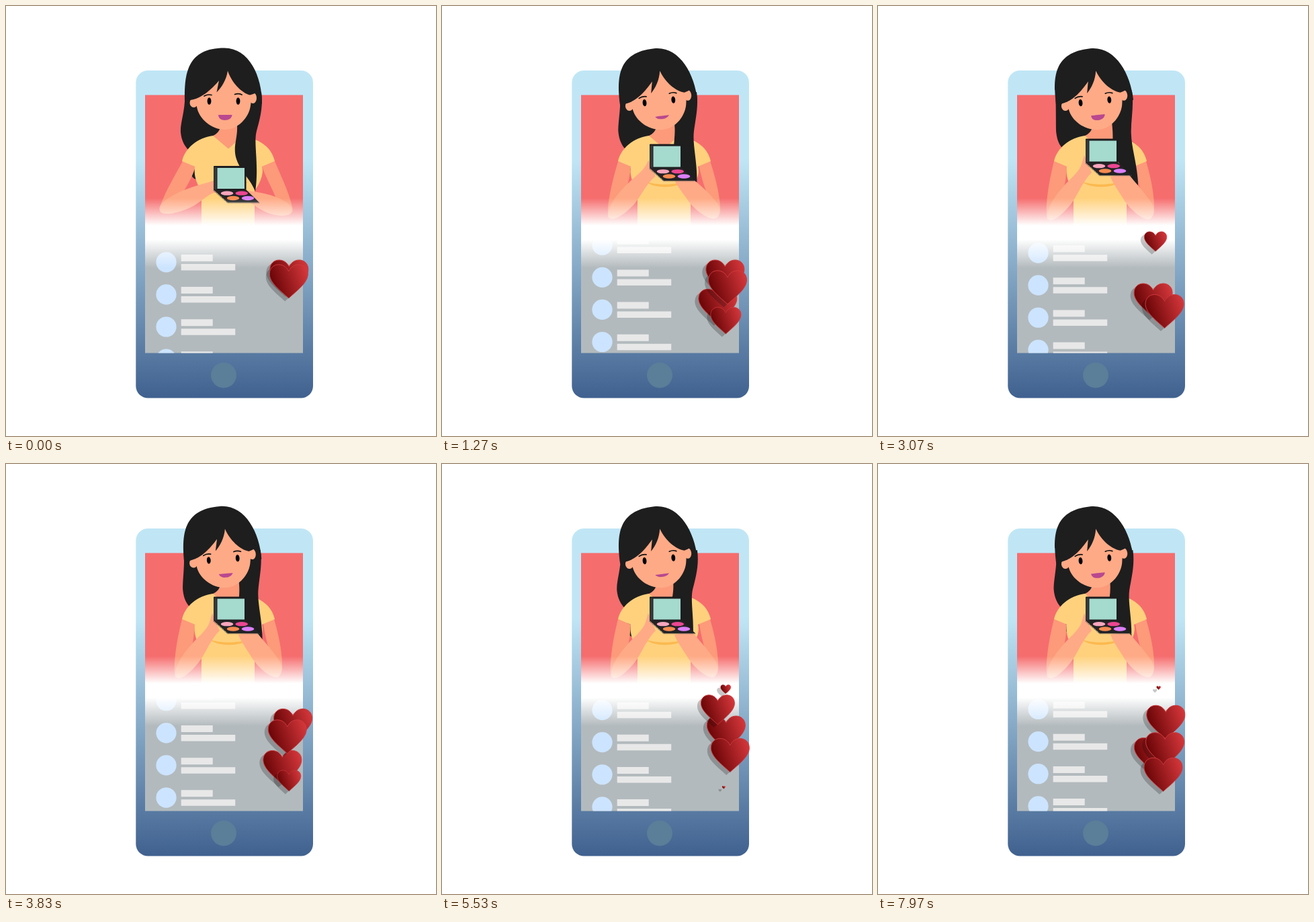
Animation, 640 px wide and 640 px high, one loop 8000 ms. Source, as an HTML page:

```html
<!DOCTYPE html>
<html lang="en">
<head>
<meta charset="utf-8">
<title>Live shopping</title>
<style>
  html, body { margin: 0; width: 100%; height: 100%; overflow: hidden; background: #fff; }
  svg { display: block; width: 100%; height: 100%; }
  .hair { fill: #1e1e1e; }
  .skin { fill: #ffaa86; }
  .shade { fill: #fc9a7a; }
  .shirt { fill: #ffd17d; }
  .brow { fill: none; stroke: #111; stroke-width: 1.7; stroke-linecap: round; }
</style>
</head>
<body>
<svg viewBox="0 0 640 640" xmlns="http://www.w3.org/2000/svg">
  <defs>
    <linearGradient id="phoneFill" x1="0" y1="0" x2="0" y2="1">
      <stop offset=".27" stop-color="#c0e6f6"/><stop offset="1" stop-color="#40618f"/>
    </linearGradient>
    <linearGradient id="fadeFill" x1="0" y1="0" x2="0" y2="1">
      <stop offset="0" stop-color="#fff" stop-opacity="0"/>
      <stop offset=".39" stop-color="#fff"/><stop offset=".59" stop-color="#fff"/>
      <stop offset="1" stop-color="#fff" stop-opacity="0"/>
    </linearGradient>
    <linearGradient id="heartFill" x1="0" y1=".6" x2="1" y2=".3">
      <stop offset=".08" stop-color="#6b0507"/><stop offset="1" stop-color="#d2363a"/>
    </linearGradient>
    <clipPath id="chat"><rect x="207" y="338" width="235" height="178.500"/></clipPath>
    <path id="heart" d="M0 25C-12 14-28.500 2-28.500-11C-28.500-20-22-25-15-25C-8-25-3-21 0-15C3-21 8-25 15-25C22-25 28.500-20 28.500-11C28.500 2 12 14 0 25Z"/>
  </defs>

  <rect x="193.300" y="96" width="263.700" height="487.500" rx="18" fill="url(#phoneFill)"/>
  <circle cx="324" cy="549.500" r="19" fill="#5b7e99"/>
  <rect x="207" y="132.500" width="235" height="206" fill="#f66d6e"/>
  <rect x="207" y="338" width="235" height="178.500" fill="#b3babd"/>
  <g clip-path="url(#chat)"><g id="list"></g></g>

  <path id="leftLock" class="hair"/>
  <path class="hair tilt" d="M266 142C265 100 270 62.500 325 62.500C362 62.500 381 105 381 145L364 160L284 160Z"/>
  <path class="shade" d="M320 174H356V197L345 205L331 214L306 194C315 190 319 186 320 174Z"/>
  <path id="leftUpper" class="shade"/>
  <path id="rightUpper" class="shade"/>
  <path class="shirt" d="M308 193C285 196 266 212 262 231L281 239C279 256 286 268 291 275V335H370V275C378 264 384 250 381 239L400 231C396 212 380 199 357 195L346 199L331 212.500Z"/>
  <path d="M303 261C318 267 345 267 361 261C350 272 314 272 303 261Z" fill="#fbb94f"/>
  <path id="rightLock" class="hair"/>
  <g class="tilt">
    <ellipse class="skin" cx="279.500" cy="144" rx="6" ry="7"/>
    <ellipse class="skin" cx="367.500" cy="137" rx="5.500" ry="8"/>
    <path class="skin" d="M282 130L284 150C287 168 306 184 326 184C345 184 362 166 364 148L367 128L330 88Z"/>
    <path class="hair" d="M274 140C291 138 306 124 317 111L313.500 128.500C321 121 328 110 330 96.500C336 114 350 129 363 132.500L368 131L374 128C374 100 352 72 325 66C295 70 268 98 268 138Z"/>
    <path class="brow" d="M295 134Q300 131 306 132.500M340.500 131.500Q346 129.500 351 132"/>
    <ellipse cx="302.500" cy="141.500" rx="2.900" ry="5.200"/>
    <ellipse cx="345.500" cy="141.500" rx="2.900" ry="5.200"/>
    <path id="mouth" fill="#b9488f"/>
  </g>
  <path id="leftFore" class="skin"/>
  <path id="rightFore" class="skin"/>
  <g id="palette">
    <rect x="309" y="238" width="48.500" height="36" rx="1" fill="#1d1d1f"/>
    <rect x="309.500" y="240" width="4" height="33" fill="#39393b"/>
    <rect x="314.500" y="241" width="40.500" height="31" fill="#a5dace"/>
    <path d="M309 273.500H357.500L377 292.500H330Z" fill="#232325"/>
    <path d="M309 274.500L330 293H377" fill="none" stroke="#555" stroke-width="1.500" stroke-dasharray="1 1"/>
    <ellipse cx="329" cy="278.700" rx="9.300" ry="3.100" fill="#f7a5bd"/>
    <ellipse cx="350.700" cy="278.700" rx="9.300" ry="3.100" fill="#ec4692"/>
    <ellipse cx="338" cy="286" rx="9.300" ry="3.200" fill="#f58a50"/>
    <ellipse cx="360" cy="286" rx="9.300" ry="3.200" fill="#dc7ff8"/>
  </g>
  <rect x="207" y="286" width="235" height="104" fill="url(#fadeFill)"/>
  <g id="hearts"></g>
</svg>
<script>
const LOOP = 8000;
const TURN = 2 * Math.PI;
const $ = id => document.getElementById(id);
const clamp = k => Math.max(0, Math.min(1, k));
const ramp = (t, from, to) => {
  const k = clamp((t - from) / (to - from));
  return k * k * (3 - 2 * k);
};

// Blend of two paths that share the same commands.
function mix(from, to, k) {
  const ends = to.match(/[\d.]+/g);
  let i = 0;
  return from.replace(/[\d.]+/g, n => (+n + (ends[i++] - n) * k).toFixed(2));
}

const armShapes = {
  leftUpper: [
    'M263 231L282 239C275 262 262 280 250 296L229 304C230 288 250 255 263 231Z',
    'M262 231L281 239C280 258 277 275 270 296L252 318C248 300 254 262 262 231Z'],
  rightUpper: [
    'M381 239L400 231C410 255 425 285 427 306L404 291C398 275 388 258 381 239Z',
    'M383 238L399 231C407 258 412 285 411 308L394 280C388 268 386 255 383 238Z'],
  leftFore: [
    'M309 260C295 265 275 268 250 281C236 288 226 297 229 305C233 314 260 308 280 297C293 289 300 280 316 276Z',
    'M307 222C302 238 303 240 292 252C276 268 252 292 252 314C254 326 272 314 287 295C296 284 305 260 318 248Z'],
  rightFore: [
    'M360 275C385 278 405 283 420 294C428 300 428 308 420 311C405 315 385 308 370 297C363 291 352 288 350 284Z',
    'M372 249C382 262 396 276 407 293C413 303 411 313 405 317C396 320 378 306 367 290C360 278 348 262 346 254Z']
};
const hairShapes = {
  leftLock: [
    'M266 125C268 155 259 172 260 188C261 200 266 209 273 216C288 228 268 240 276 252C278 256 281 258 284 258L305 250L330 180L300 140Z',
    'M264 125C265 155 265 172 265.5 188C267 200 270 207 276 213C291 226 284 236 290 242C292 245 294 247 296 247L305 245L330 180L300 140Z'],
  rightLock: [
    'M380 128C383 150 378 168 373 186C368 205 377 235 371 276C364 258 350 248 343 228C337 210 345 198 344 178L345 140Z',
    'M378 128C381 150 376 170 377 190C378 215 388 240 388 270C380 256 362 242 354 224C348 210 351 198 349 180L345 140Z']
};
const mouthShapes = [
  'M316 164C322 163.5 331 163.5 337 163.5C334 167 330 168 326 168C322 168 318 167 316 164Z',
  'M316 162C322 162 331 162 336.5 162C336.5 167 331 170 326 170C320 170 316 167 316 162Z'];

const lift = t => ramp(t, 0, 1780);
const talk = t => .5 + .5 * Math.cos(TURN * t * .00425);

function tilt(t) {
  const p = t % 4830;
  return ramp(p, 250, 700) - ramp(p, 3650, 4150);
}

// The hair swings to the other side by each of these times.
const swings = [0, 2700, 5300, 6900, 8600];
function sway(t) {
  const i = swings.findIndex(end => end > t);
  const k = ramp(t, swings[i - 1], swings[i]);
  return i % 2 ? k : 1 - k;
}

$('list').innerHTML = Array.from({ length: 7 }, (_, i) =>
  `<g transform="translate(.2 ${370 + 48.1 * i})"><circle cx="238.3" cy="11.3" r="15.1" fill="#cce4ff"/>
    <path d="M260.500 0h47v10h-47zM260.500 14h80.500v9.500h-80.500z" fill="#e8e8e8"/></g>`).join('');

// Two streams weave in opposite directions; the second floats in front.
const streams = [
  { side: -1, delay: 200, births: [-1437, -167, 510, 2180, 3150, 4047, 5333, 6240, 6995] },
  { side: 1, delay: 0, births: [-1330, 80, 890, 2437, 3533, 4570, 5490, 6872, 7460] }
];
const hearts = streams.flatMap(({ side, delay, births }) => births.map(birth => {
  const node = document.createElementNS('http://www.w3.org/2000/svg', 'g');
  node.innerHTML = `<use href="#heart" fill-opacity=".22"/>
    <use href="#heart" fill="url(#heartFill)" stroke="#cf3a3d"/>`;
  $('hearts').append(node);
  return { node, birth, side, delay };
}));

function drawHeart({ node, birth, side, delay }, t) {
  const age = t - birth;
  const size = clamp(Math.min((age - delay) / (480 - delay), (2550 - age) / 630));
  node.style.display = size ? '' : 'none';
  const x = 419.3 + 9.7 * side * Math.sin(TURN * ramp(age, 0, 2750));
  const y = Math.max(332, 483 - .064 * age) + 12 * size;
  const [shadow, body] = node.children;
  shadow.setAttribute('transform', `translate(${x - 5.5} ${y + 4.5}) scale(${size})`);
  body.setAttribute('transform', `translate(${x} ${y}) scale(${size})`);
}

function morph(shapes, k) {
  for (const id in shapes) $(id).setAttribute('d', mix(...shapes[id], k));
}

function render(t) {
  morph(armShapes, lift(t));
  morph(hairShapes, sway(t));
  $('palette').setAttribute('transform', `translate(0 ${-40.5 * lift(t)})`);
  $('mouth').setAttribute('d', mix(...mouthShapes, talk(t)));
  document.querySelectorAll('.tilt').forEach(part =>
    part.setAttribute('transform', `rotate(${-6 * tilt(t)} 327 152)`));
  $('list').setAttribute('transform', `translate(0 ${-.02015 * t})`);
  hearts.forEach(heart => drawHeart(heart, t));
}

let start;
function tick(now) {
  start ??= now;
  render((now - start) % LOOP);
  requestAnimationFrame(tick);
}
render(0);
requestAnimationFrame(tick);
</script>
</body>
</html>
```
